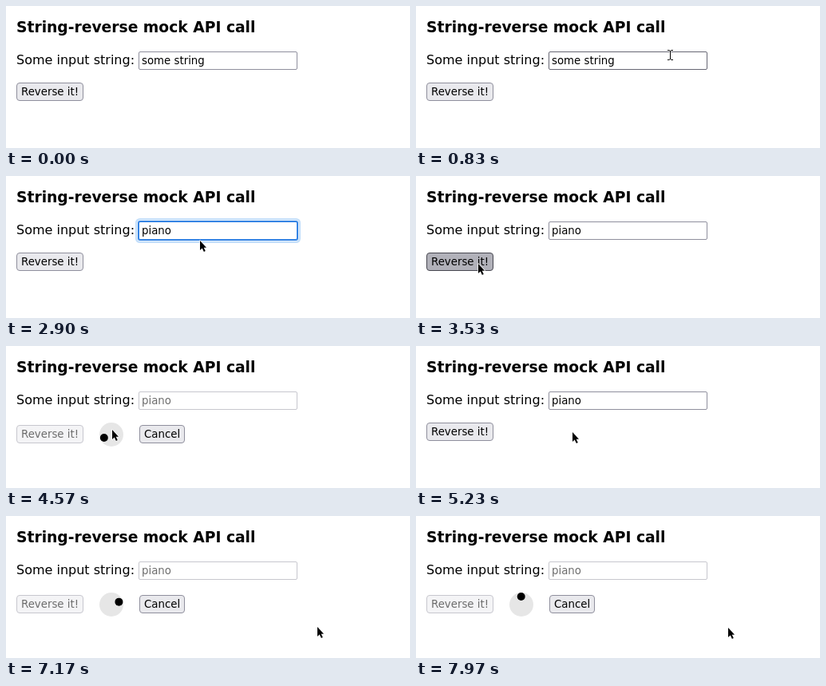
Write an HTML page that moves like this. It is 506 px wide and 178 px high and loops after 8000 ms.

```html
<!DOCTYPE html>
<html lang="en">
<head>
<meta charset="utf-8">
<title>String-reverse mock API call</title>
<style>
  html, body { margin: 0; width: 100%; height: 100%; overflow: hidden; background: #fff; }
  body { position: relative; font: 16px "DejaVu Sans", sans-serif; color: #000; cursor: default; }
  body > * { position: absolute; box-sizing: border-box; white-space: pre; }
  h3 { margin: 0; left: 13px; top: 16px; font-size: 18.72px; line-height: 21px; }
  .label { left: 13px; top: 58px; line-height: 19px; }
  .field, .btn { height: 23px; font-size: 13.333px; line-height: 15px; border: 1px solid #8f8f9d; }
  .field { left: 166px; top: 57px; width: 199px; padding: 3px; border-radius: 2px; background: #fff; }
  .field.hover { border-color: #676774; }
  .field.focus {
    border-color: #3584e4;
    box-shadow: 0 0 0 1px #3584e4, 0 0 0 2px #e6f1fc, 0 0 0 4px #c4dffa;
  }
  .field.off { border-color: #c7c7ce; color: #6d6d6d; }
  .field.picked #text { background: #3584e4; color: #fff; padding: 1px 0; }
  #caret { display: inline-block; width: 1px; height: 15px; margin-right: -1px; vertical-align: top; background: #000; }
  .btn { padding: 3px 5px; border-radius: 4px; background: #e9e9ed; }
  .btn.hover { background: #d0d0d7; border-color: #676774; }
  .btn.down { background: #b1b1b9; border-color: #484851; }
  .btn.off { background: #f4f4f6; border-color: #c7c7ce; color: #6d6d6d; }
  #reverse { left: 13px; width: 84px; }
  #cancel { left: 167px; top: 99px; width: 57px; }
  svg { left: 0; top: 0; pointer-events: none; }
</style>
</head>
<body>
<h3>String-reverse mock API call</h3>
<div class="label">Some input string:</div>
<div id="field" class="field"><span id="text">some string</span><span id="caret"></span></div>
<div id="reverse" class="btn">Reverse it!</div>
<div id="cancel" class="btn">Cancel</div>
<svg width="506" height="178">
  <g id="spinner">
    <circle cx="132" cy="111" r="15" fill="#e6e6e6"/>
    <circle id="dot" r="5"/>
  </g>
  <g id="pointer" stroke-linejoin="round">
    <path id="arrow" d="M1 1V13L3.7 10.5L5.9 15L7.8 14.1L5.7 9.7H9Z" stroke="#fff" stroke-width="1.4" paint-order="stroke"/>
    <g id="beam" fill="none">
      <path d="M-3 -5.5H-1L.5 -4.5L2 -5.5H4M.5 -4.5V5.5M-3 6.5H-1L.5 5.5L2 6.5H4" stroke="#fff" stroke-width="2.4"/>
      <path d="M-3 -5.5H-1L.5 -4.5L2 -5.5H4M.5 -4.5V5.5M-3 6.5H-1L.5 5.5L2 6.5H4" stroke="#000"/>
    </g>
  </g>
</svg>
<script>
const LOOP = 8000;
const $ = id => document.getElementById(id);
const [field, text, caret, reverse, cancel, spinner, dot, pointer, arrow, beam] =
  ["field", "text", "caret", "reverse", "cancel", "spinner", "dot", "pointer", "arrow", "beam"].map($);

// time, x, y of the pointer
const path = [
  [370, 405, 177], [830, 318, 61],
  [2730, 318, 61], [3170, 92, 117], [3400, 77, 109], [4390, 77, 109],
  [4570, 132, 104], [4870, 195, 107], [5770, 195, 107],
  [6170, 76, 105], [6560, 76, 105], [7170, 389, 138], [7270, 390, 139]
];
const typed = [[0, "some string"], [1600, "p"], [1730, "pi"], [1870, "pia"], [1930, "pian"], [2070, "piano"]];
// start, end, time of a known dot angle, that angle
const loads = [[3570, 5230, 4570, 156], [6370, LOOP, 7970, 268]];

const within = (t, a, b) => t >= a && t < b;
const show = (el, on) => { el.style.display = on ? "" : "none"; };
const ease = p => p * p * (3 - 2 * p);

function pointerAt(t) {
  const i = path.findIndex(p => p[0] > t);
  if (i < 0) return path[path.length - 1].slice(1);
  if (i === 0) return [-50, -50];
  const [t0, x0, y0] = path[i - 1], [t1, x1, y1] = path[i];
  const p = ease((t - t0) / (t1 - t0));
  return [x0 + (x1 - x0) * p, y0 + (y1 - y0) * p];
}

function draw(t) {
  const [x, y] = pointerAt(t).map(Math.round);
  const over = (l, top, w) => x >= l && x < l + w && y >= top && y < top + 23;
  const load = loads.find(l => within(t, l[0], l[1]));
  const busy = !!load;
  const focus = within(t, 1000, 3470);
  const overField = over(166, 57, 199);
  const flag = (el, name, on) => el.classList.toggle(name, on);

  text.textContent = typed.filter(s => s[0] <= t).pop()[1];
  flag(field, "hover", overField && !busy);
  flag(field, "focus", focus);
  flag(field, "picked", within(t, 1370, 1600));
  flag(field, "off", busy);
  show(caret, within(t, 1000, 1370) || within(t, 1600, 2730));

  reverse.style.top = (busy ? 99 : 96) + "px";
  flag(reverse, "hover", !busy && over(13, 96, 84));
  flag(reverse, "down", within(t, 3470, 3570) || within(t, 6270, 6370));
  flag(reverse, "off", busy);

  show(cancel, busy);
  flag(cancel, "hover", over(167, 99, 57));
  flag(cancel, "down", within(t, 5130, 5230));

  show(spinner, busy);
  if (busy) {
    const a = (load[3] + (t - load[2]) * 0.36) * Math.PI / 180;
    dot.setAttribute("cx", 132 + 10 * Math.cos(a));
    dot.setAttribute("cy", 111 + 10 * Math.sin(a));
  }

  show(arrow, !overField);
  show(beam, overField);
  pointer.setAttribute("transform", `translate(${x} ${y})`);
}

const start = performance.now();
function tick() {
  draw((performance.now() - start) % LOOP);
  requestAnimationFrame(tick);
}
tick();
</script>
</body>
</html>
```
